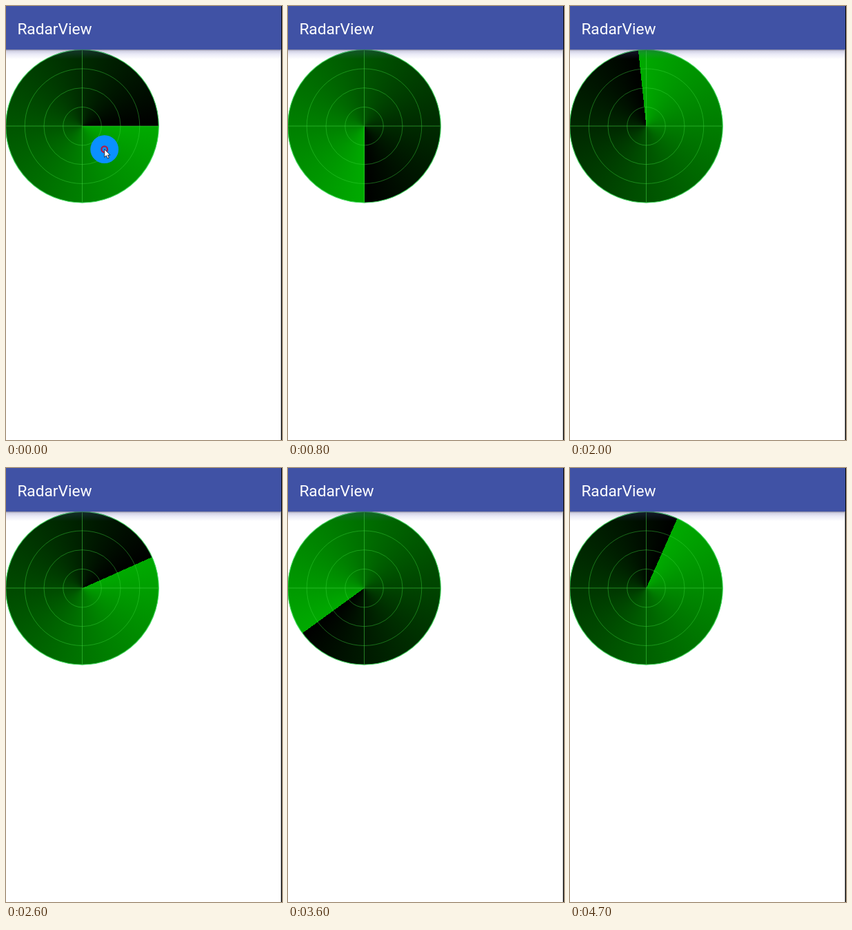
Recreate the animation shown at these times as an HTML page with a canvas. Size 400x629 px, loop 4800 ms.

```html
<!DOCTYPE html>
<html lang="en">
<head>
<meta charset="utf-8">
<title>RadarView</title>
<style>
  html, body { margin: 0; width: 100%; height: 100%; overflow: hidden; background: #fff; }
  canvas { display: block; position: absolute; left: 0; top: 0; }
  h1 {
    position: absolute; left: 16.4px; top: 19px; margin: 0;
    font: 400 22.7px/30px Roboto, sans-serif; color: #fff; white-space: nowrap;
  }
</style>
</head>
<body>
<canvas id="stage" width="400" height="629"></canvas>
<h1>RadarView</h1>
<script>
const ctx = document.getElementById('stage').getContext('2d');
const LOOP = 4800, STEP = 100;
const CX = 110.5, CY = 174.2, R = 111;

// [time in ms, sweep angle in degrees]
const SWEEP = [[0, 0], [100, 0], [800, 90], [1300, 162], [2000, 264],
               [2600, 336], [3600, 504], [4700, 654], [4800, 666]];

function lerpKeys(keys, t) {
  let i = 1;
  while (i < keys.length - 1 && t > keys[i][0]) i++;
  const [t0, a] = keys[i - 1], [t1, b] = keys[i];
  return a + (b - a) * (t - t0) / (t1 - t0);
}

function disc(x, y, r, fill) {
  ctx.beginPath();
  ctx.arc(x, y, r, 0, 2 * Math.PI);
  ctx.fillStyle = fill;
  ctx.fill();
}

function ring(x, y, r, stroke, width) {
  ctx.beginPath();
  ctx.arc(x, y, r, 0, 2 * Math.PI);
  ctx.strokeStyle = stroke;
  ctx.lineWidth = width;
  ctx.stroke();
}

function drawRadar(deg) {
  const sweep = ctx.createConicGradient(deg * Math.PI / 180, CX, CY);
  sweep.addColorStop(0, '#00aa00');
  sweep.addColorStop(1, '#000000');
  disc(CX, CY, R, sweep);

  const line = 'rgba(60, 215, 60, 0.43)';
  for (let i = 1; i < 4; i++) ring(CX, CY, R * i / 4, line, 1);
  ring(CX, CY, R - 0.2, 'rgba(70, 225, 100, 0.9)', 1.1);
  ctx.fillStyle = 'rgba(70, 215, 70, 0.52)';
  ctx.fillRect(CX - R, 173.5, 2 * R, 1);
  ctx.fillRect(110, CY - R, 1, 2 * R);
}

function drawBar() {
  ctx.fillStyle = '#4052a5';
  ctx.fillRect(0, 0, 400, 63);
  const shade = ctx.createLinearGradient(0, 63, 0, 77);
  shade.addColorStop(0, 'rgba(40, 40, 85, 0.62)');
  shade.addColorStop(0.15, 'rgba(70, 70, 140, 0.26)');
  shade.addColorStop(0.5, 'rgba(90, 90, 190, 0.12)');
  shade.addColorStop(1, 'rgba(90, 90, 190, 0)');
  ctx.fillStyle = shade;
  ctx.fillRect(0, 63, 400, 14);
  ctx.fillStyle = '#9a9a9a';
  ctx.fillRect(398, 63, 1, 566);
  ctx.fillStyle = '#000';
  ctx.fillRect(399, 0, 1, 629);
}

function drawPointer(t) {
  if (t >= 600) return;
  const p = Math.max(0, t - 100) / 400;
  const x = 142.7 + 280 * p, y = 207.7 + 77 * p;
  disc(x, y, 20.4, '#0a90ff');
  if (t < 200) ring(x, y, 4.3, '#b01c48', 2.4);
  const arrow = [[0, 0], [0, 11.5], [2.7, 9], [4.6, 13.3],
                 [6.6, 12.4], [4.8, 8.3], [8.3, 8.3]];
  ctx.beginPath();
  for (const [dx, dy] of arrow) ctx.lineTo(x + dx, y + dy);
  ctx.closePath();
  ctx.fillStyle = '#fff';
  ctx.fill();
  ctx.strokeStyle = '#223';
  ctx.lineWidth = 0.9;
  ctx.stroke();
}

function draw(ms) {
  const t = Math.floor(ms % LOOP / STEP) * STEP;
  ctx.fillStyle = '#fff';
  ctx.fillRect(0, 0, 400, 629);
  drawRadar(Math.round(lerpKeys(SWEEP, t) / 6) * 6 % 360);
  drawBar();
  drawPointer(t);
}

const start = performance.now();
function tick() {
  draw(performance.now() - start);
  requestAnimationFrame(tick);
}
tick();
</script>
</body>
</html>
```
